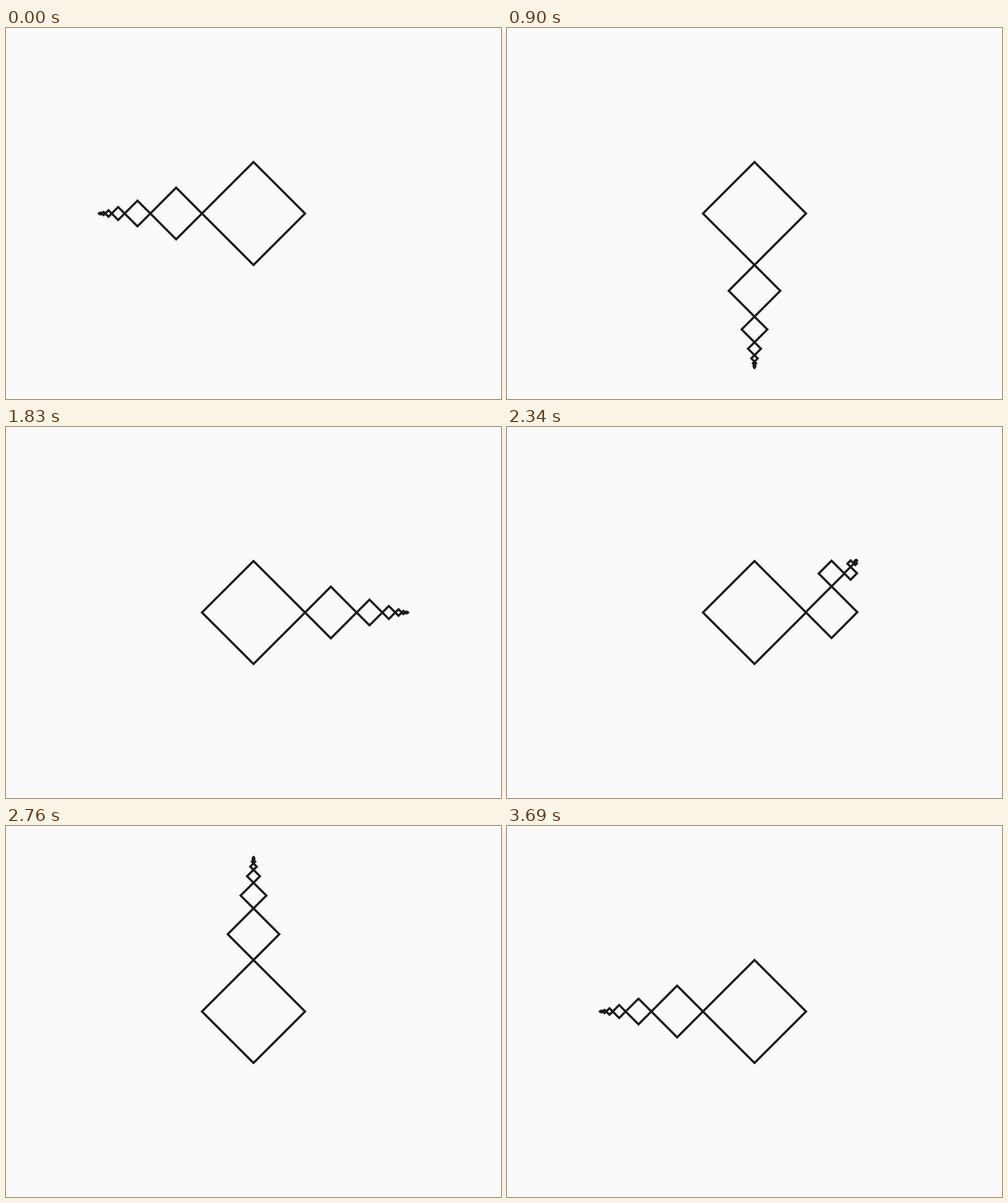
Animation, 800 px wide and 600 px high, one loop 3720 ms. Source, as an HTML page:

```html
<!DOCTYPE html>
<html lang="en">
<head>
<meta charset="utf-8">
<title>Sliding squares</title>
<style>
  html, body { margin: 0; width: 100%; height: 100%; overflow: hidden; background: #fafafa; }
  svg { display: block; width: 800px; height: 600px; }
  polygon { fill: none; stroke: #1b1b1f; stroke-width: 3.5; stroke-linejoin: miter; }
</style>
</head>
<body>
<svg id="stage" viewBox="0 0 800 600"></svg>
<script>
const LOOP = 3720, TURN = LOOP / 4;
const SLIDE = 480, LAG = 25;
const EVEN_START = 10, ODD_START = 433;
const LEVELS = 10, RADIUS = 250 / 3;
// left, down, right, up
const DIRS = [[-1, 0], [0, 1], [1, 0], [0, -1]];

const stage = document.getElementById('stage');
const radius = level => RADIUS / 2 ** level;

const squares = Array.from({ length: LEVELS }, (_, level) => {
  const r = radius(level);
  const square = document.createElementNS('http://www.w3.org/2000/svg', 'polygon');
  square.setAttribute('points', `0,${-r} ${r},0 0,${r} ${-r},0`);
  return stage.appendChild(square);
});

const clamp = u => Math.min(1, Math.max(0, u));
const ease = u => u < 0.5 ? 4 * u ** 3 : 1 - 4 * (1 - u) ** 3;

// Even levels go first, outermost leading; odd levels follow, innermost leading.
function startOf(level) {
  return level % 2
    ? ODD_START - LAG * (level - 1) / 2
    : EVEN_START + LAG * (level / 2 - 1);
}

function draw(time) {
  const t = time % LOOP;
  const turn = Math.floor(t / TURN);
  const local = t - turn * TURN;
  const from = DIRS[turn], to = DIRS[(turn + 1) % 4];
  let x = 400, y = 300;
  squares.forEach((square, level) => {
    if (level) {
      const p = ease(clamp((local - startOf(level)) / SLIDE));
      const reach = 3 * radius(level);
      x += reach * (from[0] + (to[0] - from[0]) * p);
      y += reach * (from[1] + (to[1] - from[1]) * p);
    }
    square.setAttribute('transform', `translate(${x} ${y})`);
  });
}

const begin = performance.now();
function tick() {
  draw(performance.now() - begin);
  requestAnimationFrame(tick);
}
tick();
</script>
</body>
</html>
```
